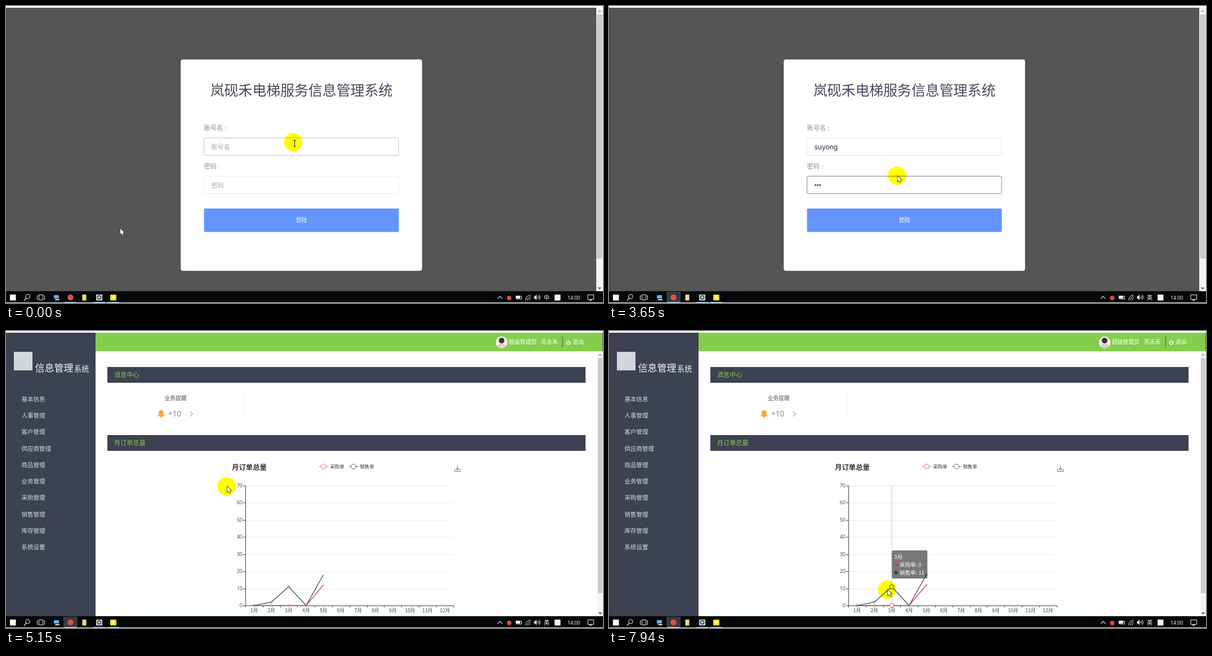
Animation, 1060 px wide and 528 px high, one loop 8000 ms. Source, as an HTML page with a canvas:

```html
<!DOCTYPE html>
<html lang="zh-CN">
<head>
<meta charset="utf-8">
<title>信息管理系统</title>
<style>
html, body { margin: 0; width: 100%; height: 100%; overflow: hidden; background: #fff; }
canvas { display: block; }
</style>
</head>
<body>
<canvas id="stage" width="1060" height="528"></canvas>
<script>
const ctx = document.getElementById('stage').getContext('2d');
const LOOP = 8000, KEY = 135;
const CJK = '"Noto Sans CJK SC", "Noto Sans CJK", sans-serif';
const LATIN = '"Open Sans", "Noto Sans", sans-serif';
const SLATE = '#3c4251', GREEN = '#84ce4d', RED = '#c23531', NAVY = '#2f4050', ICON = '#e8e8e8';
const USER = 'suyong';

const MENU = ['基本信息', '人事管理', '客户管理', '供应商管理', '商品管理',
  '业务管理', '采购管理', '销售管理', '库存管理', '系统设置'];
const BUY = [0, 0, 0, 0, 12];
const SELL = [0, 2, 11, 0, 18];

// the few places where the mouse rests or turns
const MOUSE = [
  { t: 3200, x: 510, y: 242 }, { t: 4200, x: 514, y: 381.7 },
  { t: 4680, x: 514, y: 381.7 }, { t: 5150, x: 392, y: 276 },
  { t: 6400, x: 388, y: 231 }, { t: 7130, x: 419, y: 310 },
  { t: 7500, x: 429, y: 350 }, { t: 7940, x: 494, y: 459.5 }
];

const clamp = (v, lo, hi) => Math.min(hi, Math.max(lo, v));
const ease = k => k * k * (3 - 2 * k);
const keysSince = (t, first, most) => clamp(Math.floor((t - first) / KEY) + 1, 0, most);

function mouse(t) {
  const i = MOUSE.findIndex(p => p.t > t);
  if (i < 0) return MOUSE[MOUSE.length - 1];
  const b = MOUSE[i], a = MOUSE[i - 1] || b;
  const k = a === b ? 0 : ease((t - a.t) / (b.t - a.t));
  return { x: a.x + (b.x - a.x) * k, y: a.y + (b.y - a.y) * k };
}

function rect(x, y, w, h, fill, r = 0) {
  ctx.fillStyle = fill;
  ctx.beginPath();
  ctx.roundRect(x, y, w, h, r);
  ctx.fill();
}

function frame(x, y, w, h, color, r = 0) {
  ctx.strokeStyle = color;
  ctx.lineWidth = 1;
  ctx.beginPath();
  ctx.roundRect(x, y, w, h, r);
  ctx.stroke();
}

function arc(x, y, r, from, to, color, lw = 1) {
  ctx.strokeStyle = color;
  ctx.lineWidth = lw;
  ctx.beginPath();
  ctx.arc(x, y, r, from, to);
  ctx.stroke();
}

function disc(x, y, r, fill) {
  ctx.fillStyle = fill;
  ctx.beginPath();
  ctx.arc(x, y, r, 0, 7);
  ctx.fill();
}

function ring(x, y, r, color, lw = 1) {
  disc(x, y, r, '#fff');
  arc(x, y, r, 0, 7, color, lw);
}

function line(color, lw, ...pts) {
  ctx.strokeStyle = color;
  ctx.lineWidth = lw;
  ctx.beginPath();
  for (let i = 0; i < pts.length; i += 2) ctx.lineTo(pts[i], pts[i + 1]);
  ctx.stroke();
}

// V shape with its point at x, y, looking along angle a
function chevron(x, y, size, a, color, solid) {
  ctx.save();
  ctx.translate(x, y);
  ctx.rotate(a);
  line(color, 1.1, -size, -size, 0, 0, -size, size);
  ctx.fillStyle = color;
  if (solid) ctx.fill();
  ctx.restore();
}
const UP = -Math.PI / 2, DOWN = Math.PI / 2;

// y is the middle of the glyphs
function text(s, x, y, size, color, { weight = 400, align = 'left', font = CJK } = {}) {
  ctx.font = `${weight} ${size}px ${font}`;
  ctx.textAlign = align;
  ctx.fillStyle = color;
  ctx.fillText(s, x, y + size * 0.38);
}

function scrollbar(x, top, thumbEnd) {
  const c = (x + 1060) / 2;
  rect(x, top, 1060 - x, 507 - top, '#f4f4f4');
  rect(x + 1, top + 12, 1058 - x, thumbEnd - top - 12, '#cbcbcb');
  chevron(c, top + 5, 2.5, UP, '#a3a3a3', true);
  chevron(c, 503, 2.5, DOWN, '#505050', true);
}

function label(s, y) {
  text(s, 351.5, y, 11.2, '#8f8f8f', { weight: 300 });
  text(':', 355 + s.length * 11.2, y, 11, '#8f8f8f');
}

function field(y, border, hint, empty) {
  rect(351.5, y + 0.5, 345.5, 31, '#fff', 2);
  frame(351.5, y + 0.5, 345.5, 31, border, 2);
  if (empty) text(hint, 364.5, y + 16.3, 11.1, '#a8a8a8', { weight: 300 });
}

const caret = (x, y) => line('#555', 1, x, y - 7, x, y + 7);

function login(t) {
  const typed = keysSince(t, 1480, USER.length);
  const dots = keysSince(t, 2585, 3);
  const inPassword = t > 2300;
  rect(0, 3, 1048, 504, '#555553');
  scrollbar(1048, 3, 449);
  rect(310.3, 95, 428.4, 375.7, '#fff', 4);
  text('岚砚禾电梯服务信息管理系统', 524.5, 150, 24.9, '#464a5e', { weight: 300, align: 'center' });

  label('账号名', 216.5);
  field(234, t < 120 ? '#c6c6c6' : t < 3300 ? '#858585' : '#e6e6e6', '账号名', !typed);
  text(USER.slice(0, typed), 364.5, 250, 12, '#2b3044', { font: 'Inter, ' + LATIN });
  const end = 365 + ctx.measureText(USER.slice(0, typed)).width;
  if (t > 120 && !inPassword) caret(Math.round(end) + 0.5, 250);

  label('密码', 284.5);
  field(302, inPassword ? '#858585' : '#ececec', '密码', !dots);
  for (let i = 0; i < dots; i++) disc(366.8 + i * 3.9, 318.2, 1.5, '#3c4050');
  if (inPassword && t < 2980) caret(364.5 + dots * 4, 318);

  rect(351.5, 360, 346, 41.7, '#6495ff', 2);
  text('登陆', 524.5, 380.5, 10, '#fff', { weight: 500, align: 'center' });
  if (t < 2980) arrow(202.8, t < 600 ? 395.6 : 393.8);
}

function avatar(x, y, r) {
  ctx.save();
  ctx.beginPath();
  ctx.arc(x, y, r, 0, 7);
  ctx.clip();
  rect(x - r, y - r, 2 * r, 2 * r, '#f3efec');
  disc(x, y - 3, 5, '#3a302f');
  disc(x, y + 10, 8, '#dccfc9');
  ctx.restore();
}

function shell() {
  rect(0, 3, 159, 504, SLATE);
  rect(159, 3, 901, 33, GREEN);
  rect(159, 36, 901, 471, '#fefefe');
  rect(14, 37, 33, 33, '#d3d6da');
  text('信息管理', 51.5, 65.5, 17, '#f2f3f5');
  text('系统', 121, 67, 13.2, '#f2f3f5');
  MENU.forEach((s, i) => text(s, 27.5, 120.7 + i * 29.3, 10.5, '#d9dbe1', { weight: 300 }));
  avatar(880, 20, 10.5);
  text('超级管理员', 893, 19.5, 9.8, '#fff');
  text('苏永禾', 950, 19.5, 9.9, '#fff');
  line('#4a6b35', 1, 988, 9, 988, 30);
  arc(998.5, 20.5, 3.2, -0.9, Math.PI + 0.9, '#fff', 1.4);
  line('#fff', 1.4, 998.5, 16, 998.5, 20.5);
  text('退出', 1006, 19.5, 10, '#fff');
  line('#5c5f66', 1, 1059.5, 3, 1059.5, 507);
}

function bell(x, y) {
  const c = '#faa634';
  rect(x - 4.3, y - 6.5, 8.6, 10, c, [4.3, 4.3, 0, 0]);
  rect(x - 6.3, y + 2.8, 12.6, 1.8, c, 1);
  disc(x, y + 5, 2, c);
}

function panel(y, s) {
  rect(180, y, 849, 28, SLATE);
  text(s, 192, y + 13.8, 11.1, GREEN);
}

const monthX = i => 440.4 + 30.8 * i;
const valueY = v => 488 - v * 3.043;

function legend(x, color, s) {
  line(color, 1, x, 241, x + 17, 241);
  ring(x + 8.5, 241, 4.3, color);
  text(s, x + 20, 240.5, 8.4, '#333');
}

function axes() {
  const ink = '#444';
  for (let v = 0; v <= 70; v += 10) {
    const y = Math.round(valueY(v)) + 0.5;
    if (v) line('#ececec', 1, 425, y, 793, y);
    line(ink, 1, 421, y, 425, y);
    text(v, 420, y - 0.8, 9, ink, { align: 'right', font: LATIN });
  }
  line(ink, 1, 425.5, 275, 425.5, 488);
  line(ink, 1, 425, 488.5, 795, 488.5);
  for (let i = 0; i <= 12; i++) {
    const x = Math.round(425 + i * 30.8) + 0.5;
    line(ink, 1, x, 488, x, 491.5);
    if (i < 12) text(i + 1 + '月', monthX(i), 496.5, 8.6, ink, { align: 'center' });
  }
}

function series(data, color, edge, hot) {
  ctx.save();
  ctx.beginPath();
  ctx.rect(425, 270, clamp(edge - 425, 0, 370), 230);
  ctx.clip();
  line(color, 1.2, ...data.flatMap((v, i) => [monthX(i), valueY(v)]));
  ctx.restore();
  data.forEach((v, i) => {
    if (monthX(i) < edge - 4) ring(monthX(i), valueY(v), i === hot ? 3.7 : 1.5, color, 0.9);
  });
}

function chart(t, hot) {
  text('月订单总量', 401, 242, 12.4, '#333', { weight: 700 });
  legend(555.5, '#c9706f', '采购单');
  legend(608.5, '#5c6670', '销售单');
  line('#777', 1, 801.5, 239, 801.5, 247);
  chevron(801.5, 247, 3, DOWN, '#777');
  line('#777', 1, 796.5, 245, 796.5, 249.5, 806.5, 249.5, 806.5, 245);
  axes();
  if (hot >= 0) line('#c4c4c4', 1, monthX(hot), 275, monthX(hot), 488);
  const edge = 425 + (t - 4880) * 0.52;
  series(BUY, RED, edge, hot);
  series(SELL, NAVY, edge, hot);
}

function tooltip(t, hot) {
  // follows the mouse a little late and stays above the axis
  const x = mouse(t - 120).x + 20, y = Math.min(mouse(t).y + 20, 390);
  rect(x, y, SELL[hot] > 9 ? 63 : 58, 50, 'rgba(50,50,50,.65)', 2.5);
  text(hot + 1 + '月', x + 4, y + 11, 9.6, '#fff');
  const row = (name, data, color, ry) => {
    disc(x + 7.3, ry, 3.2, color);
    text(`${name}: ${data[hot]}`, x + 13.5, ry, 9.6, '#fff');
  };
  row('采购单', BUY, '#d0453c', y + 25.2);
  row('销售单', SELL, '#2f4358', y + 39.6);
}

function dashboard(t) {
  scrollbar(1050, 36, 466);
  panel(64, '消息中心');
  text('业务提醒', 281.5, 119.5, 9.8, '#555');
  bell(275.5, 147);
  text('+10', 288, 147, 13.6, '#808080', { font: LATIN });
  chevron(331.5, 147.5, 4.5, 0, '#aaa');
  line('#f1f1f1', 1, 423.5, 113, 423.5, 158);
  panel(185, '月订单总量');
  const { x } = mouse(t);
  const hot = x > 425 && t > 7130 ? Math.max(0, Math.round((x - monthX(0)) / 30.8)) : -1;
  chart(t, hot);
  if (hot >= 0) tooltip(t, hot);
}

function taskbar(t) {
  const y = 518;
  rect(0, 507, 1060, 20, '#03080a');
  rect(0, 527, 1060, 1, '#f4f4f4');
  if (t >= 120) rect(102, 508, 25, 19, '#343a3d');
  for (const x of [114.5, 165.5, 190.5]) rect(x - 10.5, 526, 21, 1, '#5b9bc8');

  rect(7, y - 5, 10.5, 10.5, '#fff');
  arc(38.5, y - 1.5, 3.7, 0, 7, ICON, 1.1);
  line(ICON, 1.3, 36, y + 1.3, 32, y + 5.5);
  frame(58.5, y - 4.5, 7, 9, ICON);
  for (const s of [-1, 1]) {
    const x = 62 + s * 5;
    line(ICON, 1, x, y - 3, x + s * 1.5, y - 3, x + s * 1.5, y + 3.5, x, y + 3.5);
  }
  rect(85, y - 4, 9, 6, '#5db4ea', 1);
  rect(87, y + 3, 8, 2, '#d5e3ea', 1);
  disc(114.5, y, 5.3, '#dd5144');
  rect(135.5, y - 5, 7, 10.5, '#f8d976');
  rect(160, y - 5, 11, 10.5, '#d4d7da', 1);
  arc(165.5, y, 3.1, 0, 7, '#2c3338', 1.5);
  rect(185, y - 5, 11, 10.5, '#f7dd24', 1.5);
  disc(190.5, y, 2.3, '#fff');

  chevron(877.3, y - 2, 4.3, UP, ICON);
  disc(893.5, y + 1, 4, '#e04a36');
  frame(906.5, y - 2, 9, 5, ICON);
  rect(905, y - 3, 8, 5, ICON);
  for (let r = 3; r <= 9; r += 3) arc(931.5, y + 5, r, Math.PI, Math.PI * 1.5, ICON);
  rect(937.5, y - 1.5, 3, 3.5, ICON);
  chevron(938, y, 4, Math.PI, ICON, true);
  for (let r = 2; r < 7; r += 2.2) arc(942, y, r, -0.8, 0.8, ICON);
  text(t < 950 ? '中' : '英', 960, y, 10, '#fff', { align: 'center' });
  rect(974, y - 5, 10.5, 10.5, '#f2f2f2');
  text('14:00', 1008.3, y + 0.3, 8.8, '#fff', { align: 'center', font: LATIN });
  frame(1033, y - 4.5, 10.5, 8, ICON);
  chevron(1038, y + 6, 2, DOWN, ICON);
}

function shape(x, y, path) {
  const p = new Path2D(path);
  ctx.save();
  ctx.translate(x, y);
  ctx.lineJoin = 'round';
  ctx.strokeStyle = '#111';
  ctx.lineWidth = 1.3;
  ctx.stroke(p);
  ctx.fillStyle = '#fff';
  ctx.fill(p);
  ctx.restore();
}

function arrow(x, y) {
  shape(x, y, 'M0 0V10.4L2.4 8.2L4 11.8L5.7 11L4.1 7.5H7.2Z');
}

function hand(x, y) {
  shape(x, y, 'M0 1Q1-.5 2 1V5L7 6.3Q8 6.8 7.8 8.5L7 12V14.5H1V12.5L-3 8Q-2.5 6.5-1.5 7L0 8.5Z');
}

function ibeam(x, y) {
  line('#222', 1, x, y - 5.5, x, y + 5.5);
  for (const s of [-5.5, 5.5]) line('#222', 1, x - 2, y + s, x + 2, y + s);
}

function pointer(t) {
  const { x, y } = mouse(t);
  const onLogin = t < 4640;
  ctx.save();
  ctx.globalCompositeOperation = 'multiply';
  disc(x - 0.2, y + 0.2, 16.2, onLogin && t > 4300 ? '#ffe800' : '#ffff00');
  ctx.restore();
  const overField = onLogin && (y < 266 || (y > 302 && y < 334));
  if (overField) ibeam(x + 2.5, y + 2);
  else if (!onLogin && t < 4760) hand(x + 0.6, y);
  else arrow(x + 0.8, y + 0.3);
}

function draw(t) {
  rect(0, 0, 1060, 528, '#fff');
  if (t < 4640) login(t);
  else {
    shell();
    if (t >= 4760) dashboard(t);
  }
  pointer(t);
  taskbar(t);
}

const start = performance.now();
function tick() {
  draw((performance.now() - start) % LOOP);
  requestAnimationFrame(tick);
}
tick();
</script>
</body>
</html>
```
